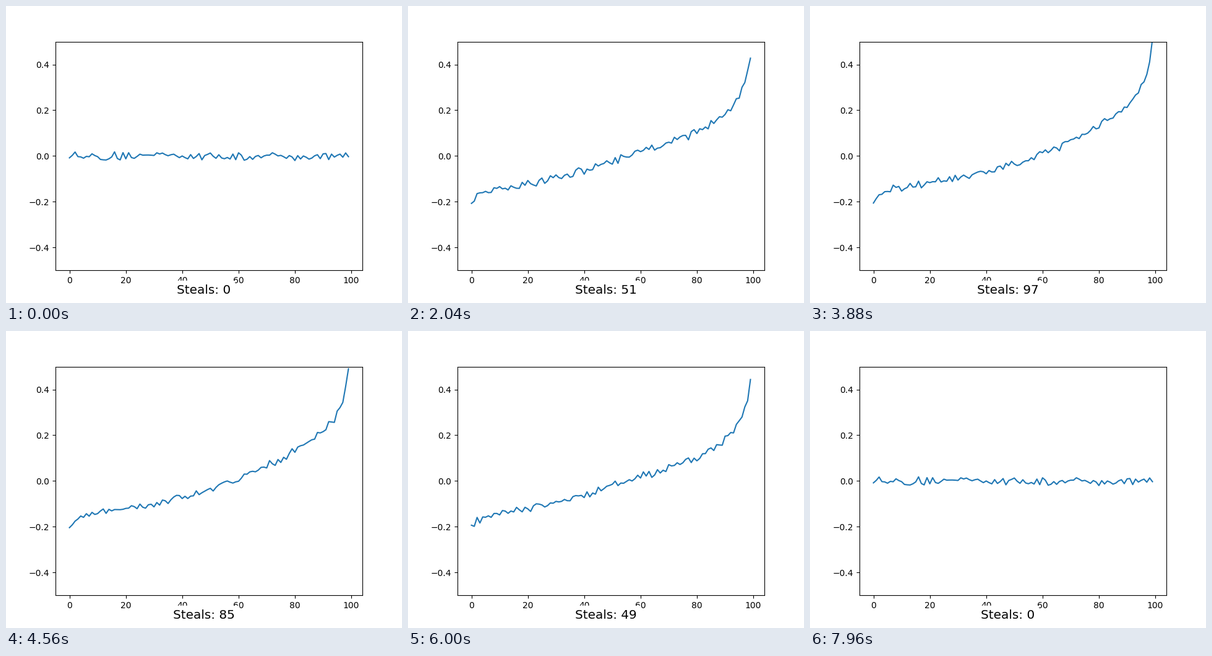
Recreate the animation shown at these times as a matplotlib script. Size 640 by 480 pixels, loop 8000 ms.

```python
import matplotlib.pyplot as plt
import numpy as np
from matplotlib.animation import FuncAnimation

STEPS = 100
PLAYERS = 100
x = np.arange(PLAYERS)
u = x / x[-1]
turns_left = x[-1] - x


def generous(last):
    """Mean gift value by turn when steals never run out."""
    body = -0.155 + 0.17 * u + 0.3 * u ** 3.2 - 0.05 * np.exp(-x / 3)
    return body + (last - body[-1]) * np.exp(-turns_left / 2)


def limited(n, last):
    """Like generous, but the steals are used up around turn n."""
    reach = 0.22 * min(n, 31)
    late = last * (1 + turns_left / reach) ** -1.4
    used_up = 0.5 + 0.5 * np.tanh((x - n - 1) / (1.6 * np.sqrt(n)))
    early = generous(last)
    return early + (late - early) * used_up


def profile(n):
    if n == 0:
        return np.zeros(PLAYERS)
    last = 0.505 * (n / 99) ** 0.2
    plenty = np.clip((n - 31) / 34, 0, 1)
    return (1 - plenty) * limited(n, last) + plenty * generous(last)


def curve(n):
    rng = np.random.default_rng(400 + n)
    return profile(n) + rng.triangular(-0.022, 0, 0.022, PLAYERS)


fig, ax = plt.subplots(figsize=(6.4, 4.8), dpi=100)
line, = ax.plot(x, curve(0))
ax.set_xlim(-4.95, 103.95)
ax.set_ylim(-0.5, 0.5)
label = fig.text(0.5, 0.032, "", ha="center", fontsize="x-large",
                 backgroundcolor="white")


def update(frame):
    n = min(frame, 2 * STEPS - 1 - frame)
    line.set_ydata(curve(n))
    label.set_text(f"Steals: {n}")
    return line, label


anim = FuncAnimation(fig, update, frames=2 * STEPS, interval=40,
                     repeat=True, repeat_delay=0)
plt.show()
```
